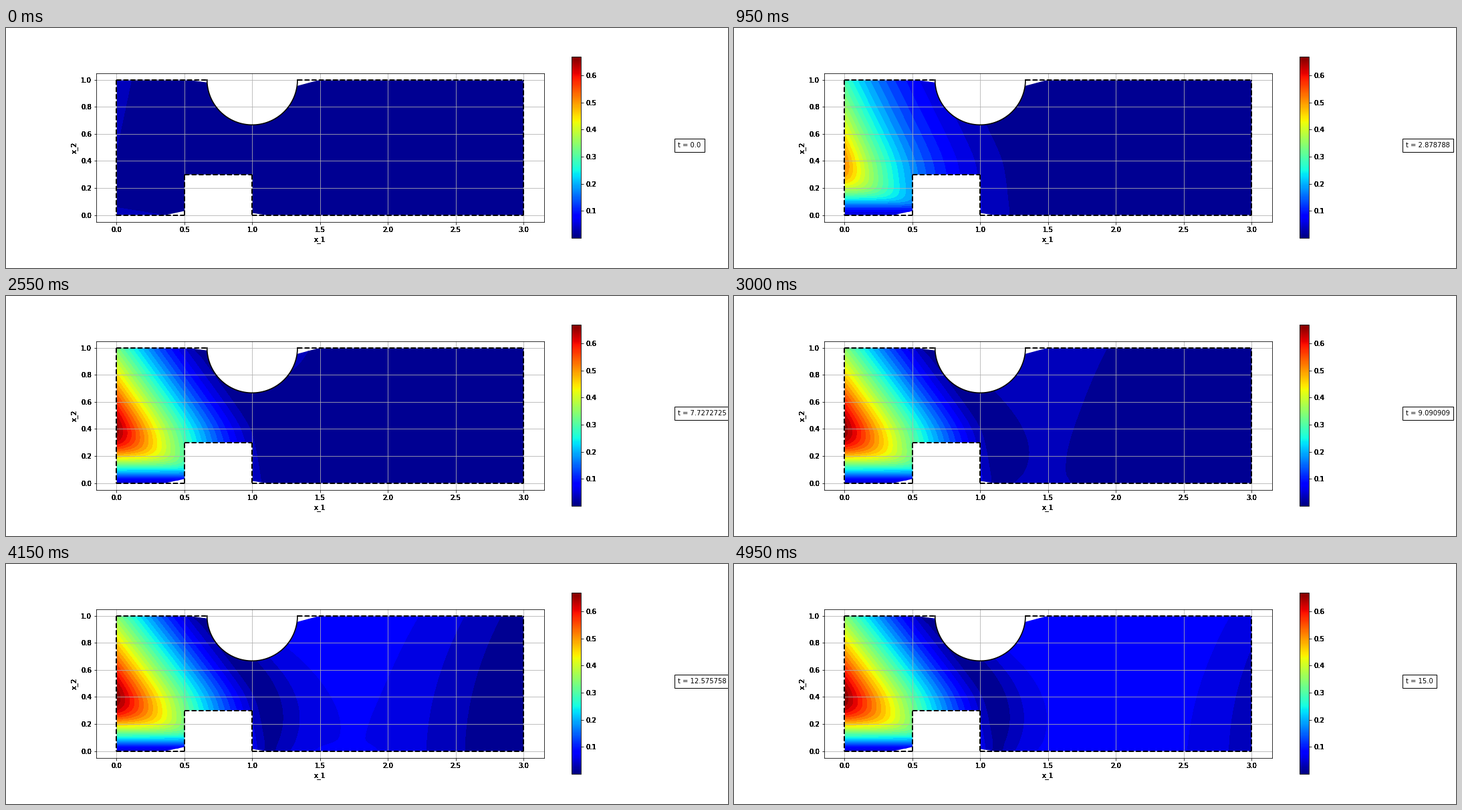
A matplotlib script for the animation above (5 s loop, 1080 by 360 pixels).

```python
import numpy as np
import matplotlib.pyplot as plt
from matplotlib.animation import FuncAnimation
from matplotlib.cm import ScalarMappable
from matplotlib.colors import Normalize
from matplotlib.path import Path

W, H, DPI = 1080, 360, 72
FRAMES, T_END = 100, 15
VMAX = 0.668
LEVELS = np.linspace(0, VMAX, 30)
plt.rcParams.update({"font.family": "DejaVu Sans", "font.size": 10})

X, Y = np.meshgrid(np.linspace(0, 3, 301), np.linspace(0, 1, 101))


def plume(t):
    """Inflow on the left: falls off along a tilted axis, limited by the floor."""
    settle = np.exp(-max(t - 2.88, 0) / 1.6)
    tilt = 0.8 - 0.3 * np.sqrt(settle)
    length = 1.13 + 1.47 * settle**2
    power = 1.35 + 3.75 * settle
    peak = 0.715 * (1 - np.exp(-t / 1.5))

    dy = Y - 0.4
    s = X + tilt * (0.6 * dy + 0.4 * np.sqrt(dy**2 + 0.01)) + 0.06 * settle
    core = (1 - s / length).clip(0, 1) ** power + 1e-3
    wall = np.hypot(0.05, 2.35 * Y) / 0.715
    return peak * (core**-5 + wall**-5) ** (-1 / 5)


def wake(t):
    """Slow flow behind the obstacles whose front moves to the right."""
    amp = 0.088 / (1 + np.exp(-(t - 8.8) / 1.9))
    rise = np.tanh((X + 1.1 * (Y - 0.25) ** 2 - 1.13) / 0.32).clip(0)
    front = 1.38 + 0.206 * (t - 7.73) + 0.25 * Y**2
    fall = 1 / (1 + np.exp((X - front) / 0.23))
    bump = 0.13 * np.exp(-((X - 1.5 - 0.06 * (t - 10.3)) / 0.25) ** 2
                         - (Y / 0.04) ** 2)
    return amp * (1 + 0.06 * Y + bump) * rise * fall


def start_spots(t):
    top = 0.21 * (Y - 0.48) - X
    low = 0.055 - 0.16 * X - Y
    return (LEVELS[1] + 0.1 * np.maximum(top, low)).clip(0) * np.exp(-t / 0.3)


def field(t):
    u = np.abs(plume(t) - wake(t))
    return np.maximum(u, start_spots(t)).clip(1e-6, VMAX - 1e-6)


fig = plt.figure(figsize=(W / DPI, H / DPI), dpi=DPI, facecolor="white")
ax = fig.add_axes([0.125, 0.125, 0.62, 0.755])
ax.set(xlim=(-0.15, 3.15), ylim=(-0.05, 1.05), aspect="equal",
       xticks=np.arange(0, 3.1, 0.5), yticks=np.arange(0, 1.1, 0.2),
       xlabel="x_1", ylabel="x_2")
ax.grid(True)
ax.set_autoscale_on(False)

# Channel walls with a round and a square obstacle
angle = np.linspace(np.pi, 2 * np.pi, 100)
arc = np.c_[1 + np.cos(angle) / 3, 1 + np.sin(angle) / 3]
floor = [(0, 1), (0, 0), (0.5, 0), (0.5, 0.3), (1, 0.3), (1, 0), (3, 0), (3, 1)]
walls = [*zip(floor, floor[1:]), ((0, 1), arc[0]), (arc[-1], (3, 1))]
for wall in walls:
    ax.plot(*zip(*wall), "k--", lw=2)
ax.plot(*arc.T, "k", lw=1.6)

# The mesh cuts the corners next to the obstacles
inner = arc[(arc[:, 1] < 0.98) & ((arc[:, 0] < 1) | (arc[:, 1] < 0.955))]
domain = Path(np.vstack([
    [[0, 0], [0, 1], [0.52, 1], [0.667, 0.98]], inner,
    [[1.333, 0.955], [1.5, 1], [3, 1], [3, 0], [1.1, 0], [1, 0.015],
     [1, 0.3], [0.5, 0.3], [0.5, 0.03], [0.36, 0], [0, 0]],
]))

cax = fig.add_axes([846.45 / W, 0.125, 13.6 / W, 0.755])
fig.colorbar(ScalarMappable(Normalize(0, VMAX), "jet"),
             cax=cax, ticks=np.arange(0.1, 0.65, 0.1))

clock = fig.text(1005.4 / W, (H - 178.6) / H, "",
                 bbox=dict(facecolor="white", edgecolor="black", pad=5))

# Overprint the axis labels so that they look heavier
fig.canvas.draw()
labels = [ax.xaxis.label, ax.yaxis.label, *ax.get_xticklabels(),
          *ax.get_yticklabels(), *cax.get_yticklabels()]
for lab in labels:
    for _ in range(7):
        fig.text(*lab.get_position(), lab.get_text(),
                 transform=lab.get_transform(), ha=lab.get_ha(),
                 va=lab.get_va(), rotation=lab.get_rotation(),
                 rotation_mode=lab.get_rotation_mode())

fill = None


def update(i):
    global fill
    t = i * T_END / (FRAMES - 1)
    if fill is not None:
        fill.remove()
    fill = ax.contourf(X, Y, field(t), LEVELS, cmap="jet", vmin=0, vmax=VMAX)
    fill.set_clip_path(domain, ax.transData)
    clock.set_text(f"t = {np.float32(t)!s}")
    return []


anim = FuncAnimation(fig, update, frames=FRAMES, interval=50,
                     init_func=lambda: [], repeat=True, repeat_delay=0)
plt.show()
```
